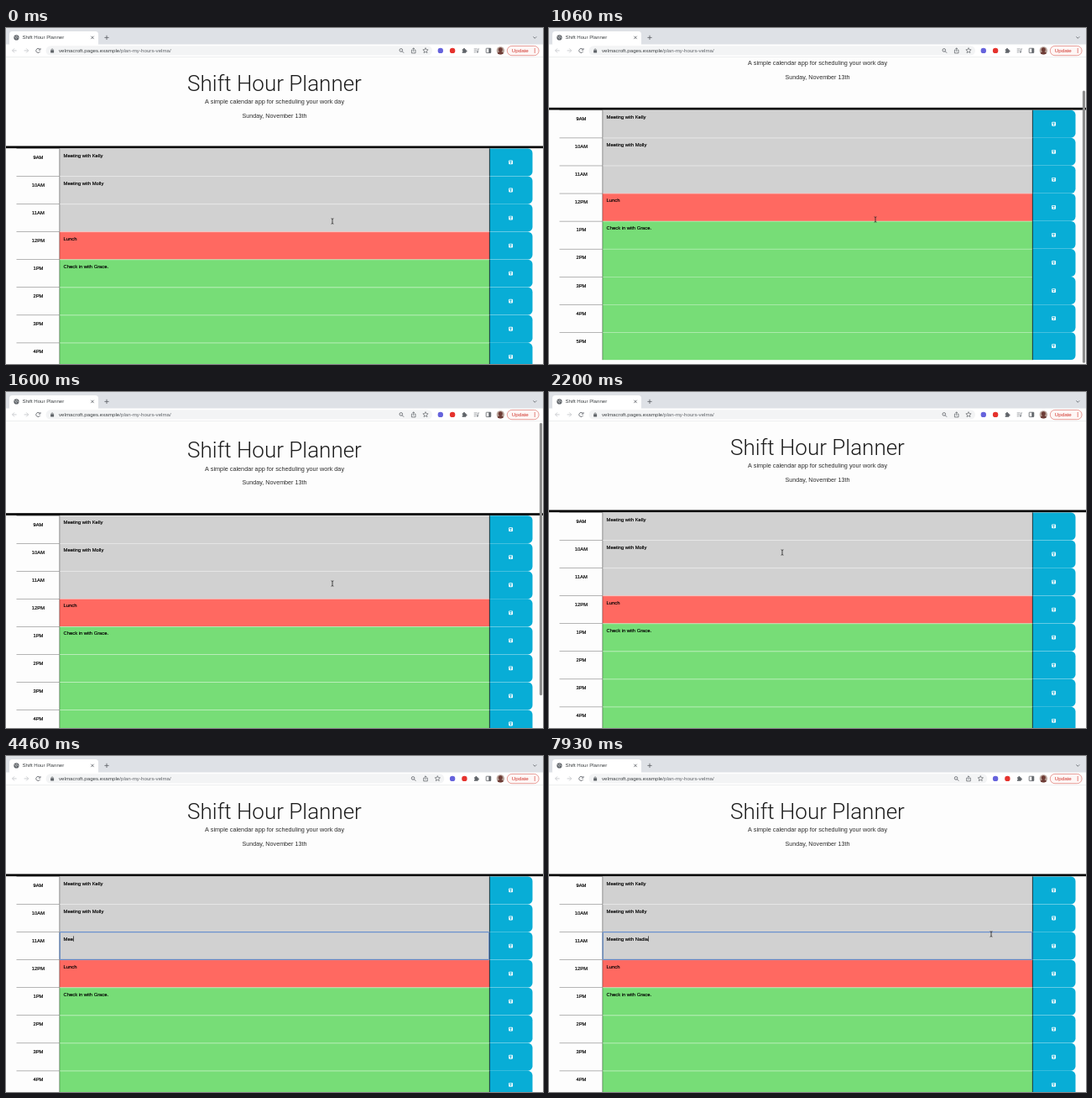
An HTML page with a canvas that plays this animation: 640 px wide and 400 px high, repeating every 8 s.

```html
<!DOCTYPE html>
<html lang="en">
<head>
<meta charset="utf-8">
<title>Shift Hour Planner</title>
<style>
  html, body { margin: 0; width: 100%; height: 100%; overflow: hidden; background: #fdfdfd; }
  canvas { display: block; width: 640px; height: 400px; }
</style>
</head>
<body>
<canvas id="stage"></canvas>
<script>
const LOOP = 8000, W = 640, H = 400;
const APP = 'Shift Hour Planner';
const SANS = '"Liberation Sans", Arial, sans-serif';
const INK = '#5f6368', PALE = '#c4c7ca', RED = '#cf3027', SAVE = '#08add6';

// Page layout: a 12-column grid with one row per working hour.
const CSS_PX = 0.3625, LEFT = 12.5, COL = 51.25;
const DESC = LEFT + COL, BUTTON = LEFT + 11 * COL;
const PAGE_TOP = 35, ROW_TOP = 143.4, ROW_H = 33.05;
const FIRST_HOUR = 9, LAST_HOUR = 17, NOON = 12, EDITED_HOUR = 11;
const MAX_SCROLL = 45.7, BOUNCE = 3.7;

const FOCUS_AT = 3200, ICONS_AT = 3300;
const TYPE_AT = 4080, KEY_MS = 160, MOUSE_BACK = 7250;
const TYPED = 'Meeting with Nadia';
const notes = { 9: 'Meeting with Kelly', 10: 'Meeting with Molly', 12: 'Lunch', 13: 'Check in with Grace.' };

const canvas = document.getElementById('stage');
const dpr = window.devicePixelRatio || 1;
canvas.width = W * dpr;
canvas.height = H * dpr;
const c = canvas.getContext('2d');

// Eased 0 to 1 between two times.
function ramp(t, from, to) {
  const p = Math.min(1, Math.max(0, (t - from) / (to - from)));
  return p * p * (3 - 2 * p);
}

function scrollAt(t) {
  return MAX_SCROLL * ramp(t, 200, 860)
    - (MAX_SCROLL + BOUNCE) * ramp(t, 1130, 1560)
    + BOUNCE * ramp(t, 1800, 2060);
}

function mouseAt(t) {
  const drift = ramp(t, 200, 860), up = ramp(t, 1800, 2200);
  const toRow = ramp(t, 2200, 2800), toSave = ramp(t, MOUSE_BACK, 7930);
  return [389 - 111 * up - 108 * toRow + 357 * toSave,
    230 - 2 * drift - 37 * up + 33 * toRow - 12 * toSave];
}

function typedAt(t) {
  return t < TYPE_AT ? '' : TYPED.slice(0, 1 + Math.floor((t - TYPE_AT) / KEY_MS));
}

function rect(x, y, w, h, fill) {
  c.fillStyle = fill;
  c.fillRect(x, y, w, h);
}

function round(x, y, w, h, r, fill, stroke, width = 0.8) {
  c.beginPath();
  c.roundRect(x, y, w, h, r);
  if (fill) { c.fillStyle = fill; c.fill(); }
  if (stroke) { c.strokeStyle = stroke; c.lineWidth = width; c.stroke(); }
}

function dot(x, y, r, fill) {
  c.beginPath();
  c.arc(x, y, r, 0, Math.PI * 2);
  c.fillStyle = fill;
  c.fill();
}

function path(x, y, d, color = INK, width = 0.85) {
  c.save();
  c.translate(x, y);
  c.strokeStyle = color;
  c.lineWidth = width;
  c.stroke(new Path2D(d));
  c.restore();
}

// A small extra weight thickens tiny letters.
function text(str, x, y, size, color, align = 'left', weight = 0) {
  c.font = size + 'px ' + SANS;
  c.textAlign = align;
  c.fillStyle = c.strokeStyle = color;
  c.fillText(str, x, y);
  c.lineWidth = weight;
  if (weight) c.strokeText(str, x, y);
  return c.measureText(str).width;
}

function zoom(x, y) {
  path(x, y, 'M1.2 -.5A1.8 1.8 0 1 1 -2.4 -.5A1.8 1.8 0 1 1 1.2 -.5M.7 .8L2.7 2.8');
}

function share(x, y) {
  path(x, y, 'M-1.2 -.8H-2.3V3H2.3V-.8H1.2M0 1.2V-3M-1.3 -1.8L0 -3.1L1.3 -1.8', INK, 0.75);
}

function star(x, y) {
  c.beginPath();
  for (let i = 0; i < 10; i++) {
    const a = i * Math.PI / 5 - Math.PI / 2, r = i % 2 ? 1.5 : 3.3;
    c.lineTo(x + r * Math.cos(a), y + r * Math.sin(a));
  }
  c.closePath();
  c.strokeStyle = INK;
  c.lineWidth = 0.7;
  c.stroke();
}

function puzzle(x, y) {
  round(x - 2.7, y - 1.7, 4.6, 4.6, 0.6, INK);
  dot(x - 0.4, y - 1.9, 1.1, INK);
  dot(x + 2.1, y + 0.6, 1.1, INK);
  dot(x - 2.6, y + 0.6, 0.8, '#fff');
}

function playlist(x, y) {
  path(x, y, 'M-3 -2H1M-3 0H1M-3 2H-.5M2 1.6V-2H3.4', '#8b8f94', 0.75);
  dot(x + 1.2, y + 1.7, 1.1, '#8b8f94');
}

function panel(x, y) {
  round(x - 2.8, y - 2.7, 5.6, 5.4, 0.5, null, INK);
  rect(x + 0.3, y - 2.7, 2.5, 5.4, INK);
}

function avatar(x, y) {
  c.save();
  c.beginPath();
  c.arc(x, y, 4.7, 0, Math.PI * 2);
  c.clip();
  rect(x - 5, y - 5, 10, 10, '#b9a49b');
  dot(x, y - 1.1, 2.5, '#6d3b35');
  dot(x, y + 5.3, 4.2, '#6d3b35');
  c.restore();
}

function tabStrip() {
  const y = 11.4;
  rect(0, 0, W, 20, '#dee1e6');
  round(4, 4, 106, 18, 3.5, '#fff');
  dot(12.4, y, 3.1, INK);
  path(12.4, y, 'M-2.2 -1L-.3 0V1.8M.2 -2.4L.7 -.8L2.3 .4', '#fff', 0.6);
  text(APP, 19.4, y + 1.9, 6.1, '#3c4043');
  path(103, y, 'M-1.7 -1.7L1.7 1.7M1.7 -1.7L-1.7 1.7');
  path(120, y, 'M-2.6 0H2.6M0 -2.6V2.6');
  path(630.3, y, 'M-1.9 -1L0 .9L1.9 -1');
}

function toolbar(t) {
  const y = 26.9, base = y + 2.2, pitch = 14.3, last = 575;
  const extensions = [
    (x, y) => dot(x, y, 3.2, '#6663dc'),
    (x, y) => dot(x, y, 3.2, '#e5322d'),
    puzzle, ...(t < ICONS_AT ? [playlist] : []), panel
  ];
  const extStart = last - (extensions.length - 1) * pitch;

  rect(0, 19.5, W, 15.5, '#fff');
  rect(0, 34.5, W, 0.5, '#dcdee1');
  path(10, y, 'M2.6 0H-2.4M0 -2.5L-2.5 0L0 2.5', PALE);
  path(24.2, y, 'M-2.6 0H2.4M0 -2.5L2.5 0L0 2.5', PALE);
  path(38.3, y, 'M2.3 1A2.5 2.5 0 1 1 1.7 -1.8M2.7 -2.9V-.8H.5');

  round(47.5, 21.3, extStart - 57.3, 11.3, 5.6, '#f3f4f5');
  round(53.1, 26.2, 4, 3.2, 0.5, INK);
  path(55.1, 26.1, 'M-1.2 0A1.2 1.2 0 0 1 1.2 0', INK, 0.7);
  const host = text('velmacroft.pages.example', 63, base, 6.2, '#3c4043');
  text('/plan-my-hours-velma/', 63 + host, base, 6.2, INK);

  [star, share, zoom].forEach((icon, i) => icon(extStart - 3.5 - (i + 1) * pitch, y));
  extensions.forEach((icon, i) => icon(extStart + i * pitch, y));
  avatar(last + pitch, y);

  round(597.3, 21.4, 37.8, 11.3, 5.6, '#fef6f5', '#dd766f', 0.7);
  text('Update', 602.8, base, 6.2, RED);
  for (let i = -1; i <= 1; i++) dot(630.2, y + 2 * i, 0.6, RED);
}

function saveIcon(x, y) {
  round(x - 2.4, y - 2.4, 4.8, 4.8, 0.8, '#fff');
  rect(x - 1.5, y - 1.6, 2.6, 1.2, SAVE);
  dot(x, y + 0.9, 0.8, SAVE);
}

function hourRow(hour, note) {
  const y = ROW_TOP + (hour - FIRST_HOUR) * ROW_H;
  const fill = hour < NOON ? '#d1d1d1' : hour === NOON ? '#ff6961' : '#77dd77';
  const label = (hour > 12 ? hour - 12 : hour) + (hour < 12 ? 'AM' : 'PM');

  rect(LEFT, y, COL, CSS_PX, '#333');
  text(label, LEFT + COL / 2 + 0.3, y + 12.5, 5.8, '#111', 'center', 0.22);

  rect(DESC, y, 10 * COL, ROW_H, fill);
  rect(DESC, y, 10 * COL, 0.6, 'rgba(255,255,255,.55)');
  rect(DESC, y, CSS_PX, ROW_H, '#000');
  text(note, 68.6, y + 10.1, 5.8, '#000', 'left', 0.16);

  round(BUTTON, y + 0.1, COL, ROW_H - 0.2, [0, 5.4, 5.4, 0], SAVE);
  rect(BUTTON - CSS_PX, y, 2 * CSS_PX, ROW_H, '#000');
  saveIcon(BUTTON + COL / 2 - 0.3, y + ROW_H / 2);
}

function focusRing(t, typed) {
  const y = ROW_TOP + (EDITED_HOUR - FIRST_HOUR) * ROW_H;
  round(DESC + 0.4, y + 0.2, 10 * COL - 0.8, ROW_H - 0.4, 0.5, null, '#3c72c4', 0.9);
  c.font = '5.8px ' + SANS;
  const lit = t >= TYPE_AT || (t - FOCUS_AT) % 1000 < 500;
  if (lit) rect(68.8 + c.measureText(typed).width, y + 4.9, 0.6, 6.4, '#000');
}

function scrollbar(t, scroll) {
  const view = H - PAGE_TOP, size = view * view / (view + MAX_SCROLL);
  const top = PAGE_TOP + 1.8 + Math.max(0, scroll) / MAX_SCROLL * (view - size - 3);
  c.globalAlpha = ramp(t, 130, 220) - ramp(t, 1900, 2180);
  round(635.9, top, 3.2, size, 1.6, '#8c8c8c');
  c.globalAlpha = 1;
}

function page(t) {
  const scroll = scrollAt(t), typed = typedAt(t), mid = W / 2;
  c.save();
  c.beginPath();
  c.rect(0, PAGE_TOP, W, H - PAGE_TOP);
  c.clip();
  c.translate(0, -scroll);

  c.font = '300 26px Roboto, sans-serif';
  c.textAlign = 'center';
  c.fillStyle = '#1d1d1d';
  c.fillText(APP, mid, 74.6);
  text('A simple calendar app for scheduling your work day', mid, 90, 7.25, '#2c2c2c', 'center');
  text('Sunday, November 13th', mid, 106.5, 7.2, '#2c2c2c', 'center');

  for (let h = FIRST_HOUR; h <= LAST_HOUR; h++)
    hourRow(h, h === EDITED_HOUR ? typed : notes[h] || '');
  rect(0, 140.5, W, 2.7, '#000');
  if (t >= FOCUS_AT) focusRing(t, typed);
  c.restore();
  scrollbar(t, scroll);
}

function mouse(t) {
  if (t >= TYPE_AT && t < MOUSE_BACK) return;
  path(...mouseAt(t), 'M-1.4 -3.2L0 -2.6L1.4 -3.2M0 -2.6V2.6M-1.4 3.2L0 2.6L1.4 3.2', '#222', 0.8);
}

function draw(t) {
  c.setTransform(dpr, 0, 0, dpr, 0, 0);
  rect(0, 0, W, H, '#fdfdfd');
  page(t);
  tabStrip();
  toolbar(t);
  mouse(t);
}

const start = performance.now();
function frame() {
  draw((performance.now() - start) % LOOP);
  requestAnimationFrame(frame);
}
frame();
</script>
</body>
</html>
```
